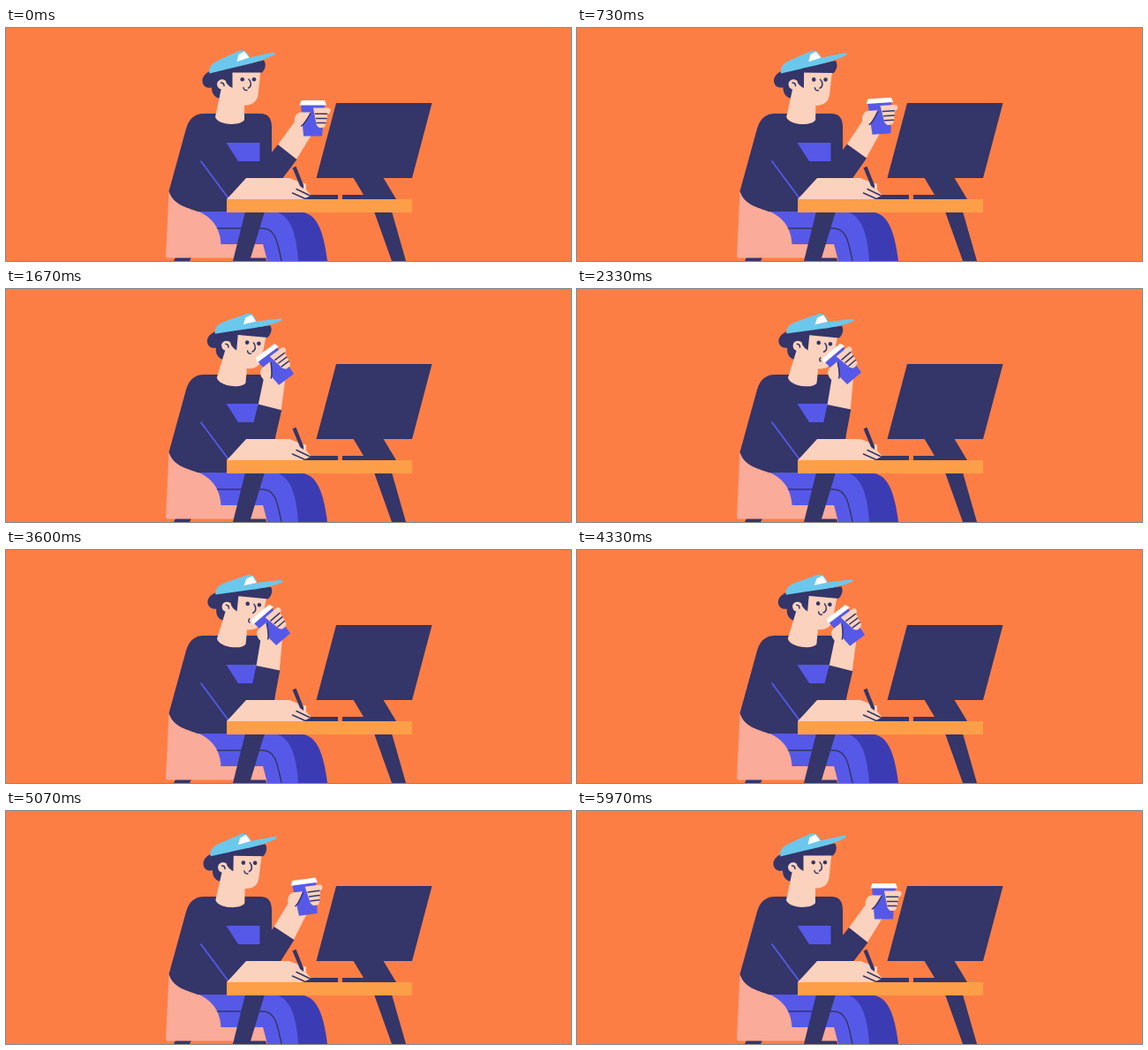
Recreate the animation shown at these times as an HTML page. Size 640 by 264 pixels, loop 7210 ms.

```html
<!DOCTYPE html>
<html lang="en">
<head>
<meta charset="utf-8">
<title>Coffee at the desk</title>
<style>
html, body { margin: 0; width: 100%; height: 100%; overflow: hidden; background: #fd7e45; }
svg { display: block; width: 100%; height: 100%; }
.navy { fill: #343569; }
.blue { fill: #5659e7; }
.deep { fill: #3b3cb4; }
.skin { fill: #fbd2be; }
.pink { fill: #faab99; }
.desk { fill: #fd9f49; }
.cyan { fill: #6bc8ec; }
.white { fill: #fff; }
.line { fill: none; stroke: #343569; stroke-width: 1.5; stroke-linecap: round; }
</style>
</head>
<body>
<svg viewBox="0 0 640 264" preserveAspectRatio="xMidYMid meet">
  <rect width="640" height="264" fill="#fd7e45"/>

  <!-- legs and chair -->
  <path class="deep" d="M290 208H330C351 208 359 226 364 264H326Z"/>
  <path class="blue" d="M217 207H300C322 209 329 232 331 264H296L291 245H240Z"/>
  <path class="line" d="M237 227H290C304 227 307 238 312 264"/>
  <path class="navy" d="M192 260H210L208 264H190ZM275 260H294L295 264H276Z"/>
  <path class="pink" d="M184.500 185C191 201 205 203 217 207.500C234 214 243 228 243.500 245H291L295 260.500H183Q181 260.500 181 258Z"/>

  <!-- torso -->
  <path class="navy" d="M238 97H224Q209 97 204 114L184.500 185C190 201 205 203 217 208H301V112Q301 97 288 97Z"/>
  <path class="blue" d="M249.500 130H287.500V151H263Z"/>
  <path d="M220.500 150.500L252 193" fill="none" stroke="#5659e7" stroke-width="1.800"/>

  <g id="head">
    <path class="navy" d="M231 49C224 52 221 58 223 63C225 68 230 68 233 67.500C233 74 236 79 243 80L262 72L262 49Z"/>
    <path class="skin" d="M256 48H288.500L285.500 76C284 85 277 87.500 270 87.500V104C266 111 241 111 237 101L243.500 70Z"/>
    <path class="navy" d="M233 49L292 36.500C295 40 294 47 290 50.500H256.500V68C252 66 249 62 247 58L236 56Z"/>
    <path class="skin" d="M249 60C246 57 240 58 239 63C239 69 244 71 250 69Z"/>
    <path class="line" d="M243.500 62C246 62 247 63 247 65.500" stroke-width="1.200"/>
    <circle class="navy" cx="267.700" cy="58.200" r="2.300"/>
    <circle class="navy" cx="281" cy="58.200" r="2.300"/>
    <path class="line" d="M275 58C278 61 278.500 66 274.500 68"/>
    <path class="line" id="mouth"/>
    <path class="cyan" d="M230.500 51.500C229 44 233 40 243 35.500L265 25.500C270 24 274 28 276 33.500L302 27.800Q305.500 27.500 304.500 30C295 35 284 39 270 42Z"/>
    <path class="white" d="M263.500 30L270 26.500L275.500 33.500L261.500 38Z"/>
  </g>

  <g id="arm">
    <path class="skin" d="M306 135L327 106L348 118L327 152Z"/>
    <path class="navy" d="M308 132L329.500 149L312 172L296 196L278 170Z"/>
    <g id="hand">
      <path class="skin" d="M327 107C326 100 330 95.500 335 95.500H346V119L338 123Z"/>
      <path class="blue" d="M334 86H361L358 122.500H337Z"/>
      <path class="white" d="M334.500 82H361L363 87.500H332.500Z"/>
      <path class="skin" d="M327 107C326 100 330 95.500 335 95.500H345.500L336 110L334 119Z"/>
      <path class="line" d="M345 96.500C342 102 339 108 334.500 111"/>
      <path class="skin" d="M348 90.500H365Q368 91 367.500 94.500Q367 97 364 97.500V102L363 103V107L362 108V110Q361 113 358 113H355Q351 111 351 106Z"/>
      <path class="line" d="M350.500 97.200H363.500M351.500 102.400H363M352 107.600H362"/>
    </g>
  </g>

  <!-- monitor, desk, writing hand -->
  <path class="navy" d="M374 85H482.500L460 170H351.500ZM393 169H427L442 194H381V189H405ZM338 189H376V194H338Z"/>
  <path class="navy" d="M271 208H293L276 264H257ZM417 208H437L453 264H437Z"/>
  <path class="skin" d="M272 170H321L335 175.500L340 176.500V183L345 189L343 191L336 194H250Z"/>
  <path class="navy" d="M324.500 158.500L328.500 156.800L337 178V182L333 179Z"/>
  <path class="line" d="M329 182.500L343.500 189.500M324.500 187L338 193"/>
  <rect class="desk" x="250" y="194" width="210" height="15"/>
</svg>
<script>
const LOOP = 7210, MOVE = 2400, BACK = 3600;
const [head, arm, hand, mouth] = ["head", "arm", "hand", "mouth"].map(id => document.getElementById(id));
const clamp = v => Math.min(1, Math.max(0, v));
const mix = (a, b, k) => a + (b - a) * k;

// cubic-bezier(.75, 0, .25, 1), solved by bisection
function ease(x) {
  if (x <= 0 || x >= 1) return clamp(x);
  let lo = 0, hi = 1, s = 0.5;
  for (let i = 0; i < 24; i++) {
    s = (lo + hi) / 2;
    const bx = 2.25 * s * (1 - s) ** 2 + 0.75 * s * s * (1 - s) + s ** 3;
    if (bx < x) lo = s; else hi = s;
  }
  return s * s * (3 - 2 * s);
}

const turn = (el, angle, x, y) => el.setAttribute("transform", `rotate(${angle} ${x} ${y})`);

// p: 0 = cup held out, 1 = sipping
function pose(p) {
  turn(head, 5.6 * p, 243, 121);
  turn(arm, -26.5 * p, 293.6, 183.6);
  turn(hand, -14 * p, 334, 116);
  const k = clamp((p - 0.93) / 0.07);
  const at = (x0, y0, x1, y1) => `${mix(x0, x1, k)} ${mix(y0, y1, k)}`;
  mouth.setAttribute("d", `M${at(269, 67.5, 271.5, 75)}Q${at(269.5, 71, 269.5, 77.5)} ${at(273, 70.5, 272, 79)}`);
}

function draw(now) {
  const t = now % LOOP;
  pose(t < BACK ? ease(t / MOVE) : 1 - ease((t - BACK) / MOVE));
}

const start = performance.now();
function tick() {
  draw(performance.now() - start);
  requestAnimationFrame(tick);
}
tick();
</script>
</body>
</html>
```
